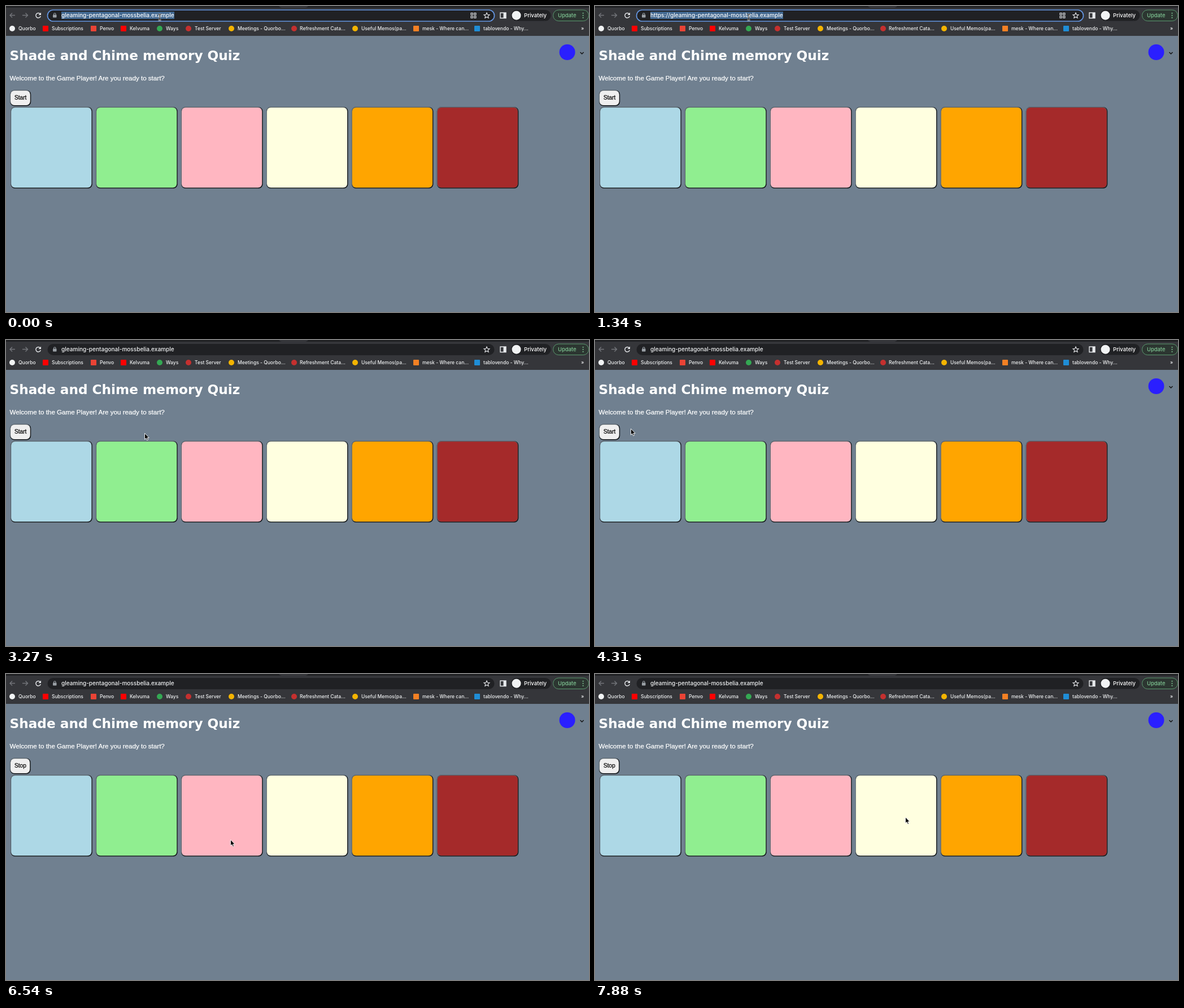
Animation of 1032x543 px, one loop 8000 ms. Source, as an HTML page:

```html
<!DOCTYPE html>
<html lang="en">
<head>
<meta charset="utf-8">
<title>Memory quiz</title>
<style>
  html, body { margin: 0; width: 100%; height: 100%; overflow: hidden; background: #708090; }
  svg, #url { position: absolute; left: 0; top: 0; }
  text, #url { font-family: Inter, sans-serif; font-weight: 500; fill: #fff; white-space: pre; }
  #url { left: 98px; top: 10px; font-size: 10.05px; line-height: 13px; color: #f1f3f4; }
  #url span { display: inline-block; height: 13px; vertical-align: top; }
  #sel { background: #41678f; color: #fff; }
  #marks text { font-size: 8.5px; fill: #f1f3f4; }
  .title { font: bold 23.2px 'DejaVu Sans', sans-serif; }
  .plain { font-family: 'Liberation Sans', Arial, sans-serif; font-weight: 400; stroke-width: .25; }
  .line { fill: none; stroke: #e8eaed; stroke-width: 1.4; }
  .thin { stroke-width: 1.1; }
  .dim { stroke: #73757a; }
</style>
</head>
<body>
<svg width="1032" height="543">
  <!-- browser frame -->
  <path d="M0 0H1032V53H0Z" fill="#35363a"/>
  <path d="M0 0H483Q485 3 488 3H0ZM1032 0H535Q533 3 530 3H1032Z" fill="#202124"/>
  <path class="line dim" d="M16 16.5H7M11 12.5L7 16.5L11 20.5M29 16.5H38.5M34.5 12.5L38.5 16.5L34.5 20.5"/>
  <g id="reload">
    <path class="line" d="M60.5 14A4.3 4.3 0 1 0 61.3 18"/>
    <path d="M62 11.5V16H57.5Z" fill="#e8eaed"/>
  </g>
  <path id="halt" class="line" d="M53.5 13L60.5 20M60.5 13L53.5 20"/>
  <rect id="bar" x="73.500" y="7" width="791" height="20" rx="10" fill="#202124" stroke-width="1.7"/>
  <rect x="83" y="15.5" width="6.5" height="5" rx=".8" fill="#9aa0a6"/>
  <path class="line thin" style="stroke:#9aa0a6" d="M84.5 16V14.5A1.7 1.7 0 0 1 88 14.5V16"/>
  <g id="grid" class="line thin"></g>
  <path class="line thin" d="M851 12L852.4 15.3L856 15.6L853.3 17.9L854.1 21.4L851 19.5L847.9 21.4L848.7 17.9L846 15.6L849.6 15.3Z"/>
  <path class="line" d="M875 12H885V21.5H875Z"/>
  <path d="M880.5 12H885V21.5H880.5Z" fill="#e8eaed"/>
  <rect x="894" y="7" width="70.5" height="19.5" rx="9.7" fill="#202124"/>
  <circle cx="903.5" cy="16.7" r="8" fill="#f1f3f4"/>
  <text x="917" y="20.2" font-size="9.6">Privately</text>
  <rect x="968.5" y="7" width="63" height="19.5" rx="9.7" fill="#2c3631" stroke="#5c9a70"/>
  <text x="977" y="20.2" font-size="9.4" style="fill:#81c995">Update</text>
  <path d="M1021.5 12.8h.01M1021.5 16.8h.01M1021.5 20.8h.01" stroke="#81c995" stroke-width="2" stroke-linecap="round"/>
  <g id="marks"><text x="1018" y="43">»</text></g>

  <!-- page -->
  <text class="title" x="6.5" y="96">Shade and Chime memory Quiz</text>
  <text class="plain" x="6.5" y="132.3" font-size="11.6" stroke="#fff">Welcome to the Game Player! Are you ready to start?</text>
  <g id="avatar">
    <circle cx="993.5" cy="82" r="14" fill="#2a1fff"/>
    <path class="line" style="stroke:#111" d="M1016.5 82L1019.5 85L1022.5 82"/>
  </g>
  <g id="button"></g>
  <text id="label" class="plain" x="15" y="166.3" font-size="10.1" stroke="#000" style="fill:#000"></text>
  <g id="cards"></g>
</svg>

<div id="url"><span id="pre"></span><span id="sel"></span><span id="post"></span></div>

<svg width="1032" height="543">
  <defs>
    <path id="beamShape" fill="none" d="M-2.5 -5.5Q0 -5.5 0 -4Q0 -5.5 2.5 -5.5M0 -4V4M-2.5 5.5Q0 5.5 0 4Q0 5.5 2.5 5.5M-1.5 2H1.5"/>
  </defs>
  <path id="caret" d="M272.5 10V23" stroke="#e8eaed"/>
  <g id="cursor" stroke-linejoin="round">
    <g id="beam">
      <use href="#beamShape" stroke="#fff" stroke-width="2.2"/>
      <use href="#beamShape" stroke="#000"/>
    </g>
    <path id="arrow" d="M0 0V10.8L2.5 8.6L4.2 12.5L6 11.7L4.4 8H7.7Z" fill="#000" stroke="#fff" stroke-width=".9"/>
  </g>
</svg>

<script>
const LOOP = 8000, STEP = 148.6;
const $ = id => document.getElementById(id);
const show = (id, on) => $(id).style.display = on ? '' : 'none';
const within = (t, from, to) => t >= from && t < to;

// Bevelled box: one colour for the top-left edge, one for the bottom-right
const DARK = '#15181a', LIGHT = '#626c74';
const bevel = (x, y, w, h, fill, topLeft = LIGHT, bottomRight = DARK) => {
  const box = (inset, trim, color) =>
    `<rect x="${x + inset}" y="${y + inset}" width="${w - trim}" height="${h - trim}" rx="${7.5 - trim / 4}" fill="${color}"/>`;
  return box(0, 0, bottomRight) + box(0, 1.4, topLeft) + box(.9, 2.4, fill);
};

const colors = ['#add8e6', '#90ee90', '#ffb6c1', '#ffffe0', '#ffa500', '#a52a2a'];
const cards = lit => colors.map((color, i) =>
  bevel(8.3 + 150.9 * i, 179.3, 144.5, 144.4, lit && i === 3 ? '#ff0' : color)).join('');

$('grid').innerHTML = [[823, 12.5], [828.7, 12.5], [823, 18], [828.7, 18]]
  .map(([x, y]) => `<rect x="${x}" y="${y}" width="3.2" height="3.2"/>`).join('');

// Bookmarks: icon centre, icon colour, round icon, text start, text
$('marks').innerHTML += [
  [11, '#f1f3f4', 1, 22, 'Quorbo'],
  [70, '#f00', 0, 81, 'Subscriptions'],
  [155, '#ea4335', 0, 166, 'Penvo'],
  [208, '#f00', 0, 219, 'Kelvuma'],
  [272, '#34a853', 1, 283, 'Ways'],
  [323, '#c5302f', 1, 334, 'Test Server'],
  [399, '#f4b400', 1, 410, 'Meetings - Quorbo...'],
  [510, '#c5302f', 1, 520, 'Refreshment Cata...'],
  [618, '#f4b400', 1, 629, 'Useful Memos(pa...'],
  [726, '#f48024', 0, 737, 'mesk - Where can...'],
  [834, '#1f8dd6', 0, 845, 'tablovendo - Why...']
].map(([cx, color, round, x, label]) =>
  `<rect x="${cx - 5}" y="35" width="10" height="10" rx="${round ? 5 : 1}" fill="${color}"/>` +
  `<text x="${x}" y="43">${label}</text>`).join('');

// Pointer legs: first step, last step, end point
const legs = [
  [0, 0, 272, 20],
  [290, 290, 307, 25],
  [590, 590, 272, 20],
  [2380, 2380, 320, 165],
  [2680, 2830, 262, 166],
  [3120, 3270, 245.5, 165.5],
  [3420, 4160, 63.5, 158],
  [4310, 4310, 63.5, 157.5],
  [4610, 5500, 17, 161],
  [6390, 6540, 397.5, 294],
  [6840, 7430, 553, 255],
  [7880, 7880, 549.5, 254]
];

function pointer(t) {
  const i = legs.findLastIndex(leg => t >= leg[0]);
  const [start, end, x, y] = legs[i];
  const [, , x0, y0] = legs[Math.max(0, i - 1)];
  const steps = Math.round((end - start) / STEP) + 1;
  const done = t >= end ? 1 : Math.min(1, (Math.floor((t - start) / STEP + .02) + 1) / steps);
  return [x0 + (x - x0) * done, y0 + (y - y0) * done];
}

const host = 'gleaming-pentagonal-mossbelia.example';
const full = 'https://' + host;

// Text before, inside and after the selection
function address(t) {
  if (t < 140) return ['', host, ''];
  if (t < 1040) return [full, '', ''];
  if (t < 1340) return ['https://gleaming-pentagonal-', 'mossbelia', '.example'];
  if (t < 2080) return ['', full, ''];
  return [host, '', ''];
}

function draw(t) {
  const parts = address(t);
  ['pre', 'sel', 'post'].forEach((id, i) => $(id).textContent = parts[i]);
  const focused = t < 2080;
  $('bar').setAttribute('stroke', focused ? '#6496e2' : 'none');
  show('grid', focused);
  show('caret', within(t, 140, 590));

  const loading = within(t, 2080, 3120);
  show('halt', loading);
  show('reload', !loading);
  show('avatar', !within(t, 2680, 3710));

  const started = t >= 5940;
  const edges = within(t, 5790, 5940) ? [DARK, LIGHT] : [LIGHT, DARK];
  $('button').innerHTML = bevel(7.2, 149.4, started ? 36.4 : 37, 28, '#efefef', ...edges);
  $('label').textContent = started ? 'Stop' : 'Start';
  $('cards').innerHTML = cards(within(t, 6840, 7880));

  show('beam', t < 2380);
  show('arrow', t >= 2380);
  $('cursor').setAttribute('transform', `translate(${pointer(t)})`);
}

function frame() {
  draw(performance.now() % LOOP);
  requestAnimationFrame(frame);
}
frame();
</script>
</body>
</html>
```
